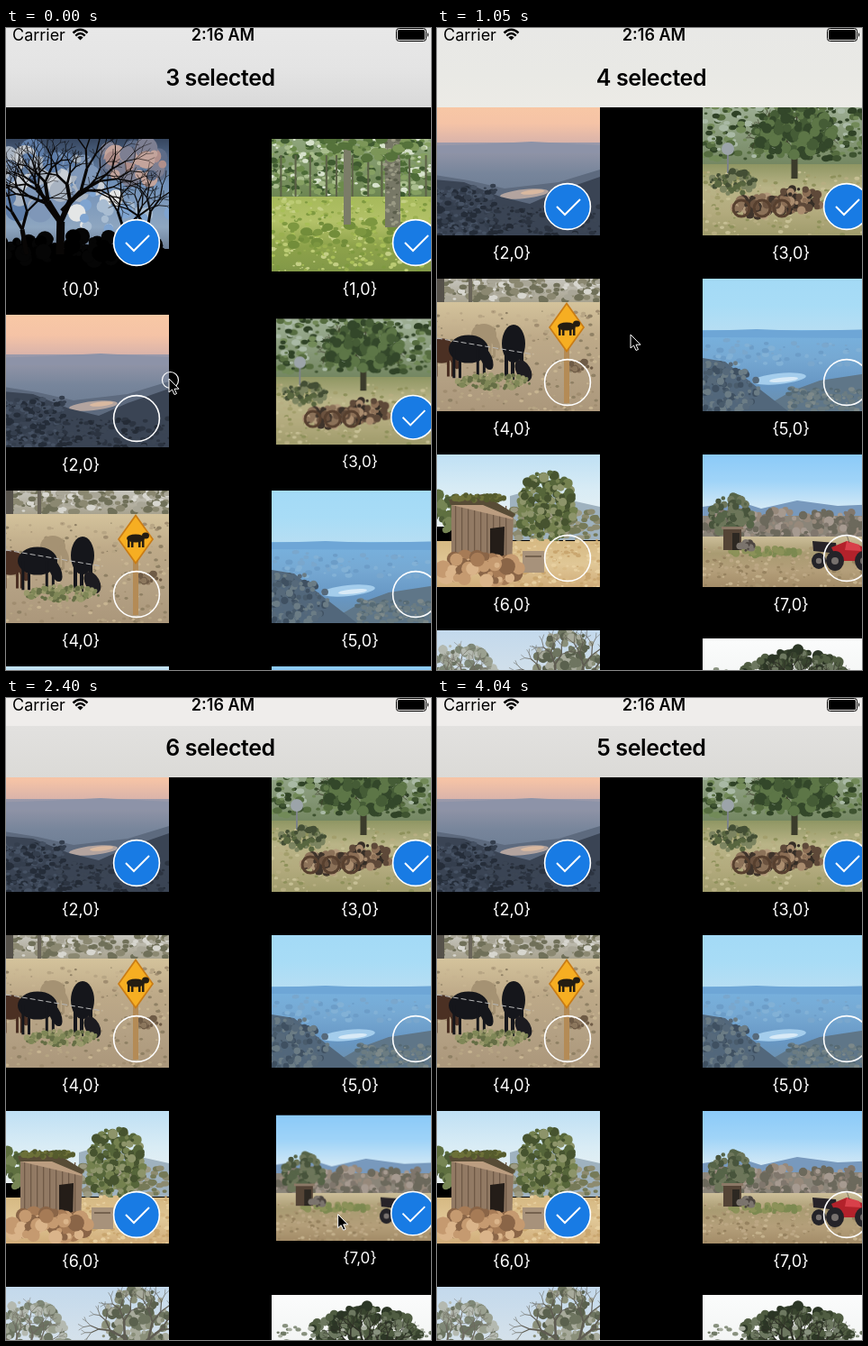
Recreate the animation shown at these times as an HTML page with a canvas. Size 472x712 px, loop 4140 ms.

```html
<!DOCTYPE html>
<html lang="en">
<head>
<meta charset="utf-8">
<title>Photo picker</title>
<style>
html, body { margin: 0; width: 100%; height: 100%; overflow: hidden; background: #000; }
#stage { position: relative; width: 472px; height: 712px; overflow: hidden; background: #000; font-family: Inter, Roboto, sans-serif; }
#list { position: absolute; left: 0; top: 0; }
.cell { position: absolute; width: 196px; height: 178px; }
.cell canvas, .cell svg { position: absolute; left: 0; top: 0; }
.label { position: absolute; left: 0; top: 155px; width: 100%; text-align: center; color: #fff; font-size: 18px; line-height: 23px; }
.badge circle { fill: none; stroke: #fff; stroke-width: 1.6; }
.badge path { fill: none; stroke: #fff; stroke-width: 2; visibility: hidden; }
.on circle { fill: #187be4; }
.on path { visibility: visible; }
#head { position: absolute; left: 0; top: 0; width: 472px; height: 88px; color: #000; }
#head div { position: absolute; white-space: nowrap; line-height: 22px; font-size: 18px; }
#head #title { left: 0; top: 39px; width: 476px; text-align: center; font-size: 25px; line-height: 32px; font-weight: 600; letter-spacing: -.4px; }
#head svg { position: absolute; left: 0; top: 0; }
#cursor { position: absolute; left: 0; top: 0; overflow: visible; }
</style>
</head>
<body>
<div id="stage">
  <div id="list"></div>
  <div id="head">
    <div style="left:7px;top:-3px">Carrier</div>
    <div style="left:5px;top:-3px;width:472px;text-align:center;font-weight:600">2:16 AM</div>
    <div id="title"></div>
    <svg width="472" height="24">
      <g fill="none" stroke="#000" stroke-width="2.4">
        <path d="M74.5 5.5Q82.5-2 90.5 5.5M77.3 8.6Q82.5 3.6 87.7 8.6"/>
      </g>
      <path d="M79.4 10.4Q82.5 7.6 85.6 10.4L82.5 13.6Z"/>
      <rect x="433.5" y=".5" width="33" height="14" rx="3" fill="none" stroke="#000"/>
      <rect x="435" y="2" width="30" height="11" rx="1.5"/>
      <path d="M468 5q2.5 2.5 0 5z"/>
    </svg>
  </div>
  <svg id="cursor" width="20" height="24">
    <circle id="ring" cx="1.5" cy="1.5" r="9" fill="none" stroke="#fff" stroke-width="1.2"/>
    <path d="M0 0V15L3.5 12 6 17.5 8.5 16.5 6 11.2H11Z" fill="#000" stroke="#fff"/>
  </svg>
</div>
<script>
const $ = id => document.getElementById(id);
const W = 196, H = 147;
let g, seed;

// ---- drawing helpers ----
const rnd = () => (seed = (seed * 16807) % 2147483647) / 2147483647;
const pick = list => list[Math.floor(rnd() * list.length)];
function rect(color, x, y, w, h) {
  g.fillStyle = color;
  g.fillRect(x, y, w, h);
}
function fade(y, h, ...colors) {
  const grad = g.createLinearGradient(0, y, 0, y + h);
  colors.forEach((c, i) => grad.addColorStop(i / (colors.length - 1), c));
  rect(grad, 0, y, W, h);
}
function poly(color, ...p) {
  g.fillStyle = color;
  g.beginPath();
  for (let i = 0; i < p.length; i += 2) g.lineTo(p[i], p[i + 1]);
  g.fill();
}
function oval(color, x, y, rx, ry = rx, turn = 0) {
  g.fillStyle = color;
  g.beginPath();
  g.ellipse(x, y, rx, ry, turn, 0, 7);
  g.fill();
}
// speckles inside a box
function fleck(n, x, y, w, h, r, colors) {
  const list = colors.split(' ');
  while (n--) {
    const s = r * (.4 + rnd());
    oval(pick(list), x + rnd() * w, y + rnd() * h, s, s * .7);
  }
}
// speckles inside an oval
function leaves(n, x, y, rx, ry, r, colors) {
  const list = colors.split(' ');
  while (n--) {
    const a = rnd() * 6.3, d = Math.sqrt(rnd());
    oval(pick(list), x + Math.cos(a) * d * rx, y + Math.sin(a) * d * ry, r * (.4 + rnd()));
  }
}
function limb(color, x, y, a, len, w) {
  const x2 = x + Math.cos(a) * len, y2 = y + Math.sin(a) * len;
  g.strokeStyle = color;
  g.lineWidth = w;
  g.beginPath();
  g.moveTo(x, y);
  g.lineTo(x2, y2);
  g.stroke();
  if (w < .6) return;
  for (const side of [-1, 1]) {
    limb(color, x2, y2, a + side * (.2 + rnd() * .5), len * (.68 + rnd() * .2), w * .66);
  }
}
function cow(color, x, y, w, h) {
  oval(color, x, y, w / 2, h * .3);
  for (const k of [-.4, -.25, .2, .36]) rect(color, x + k * w, y, 3, h * .62);
  oval(color, x + w * .45, y + h * .2, w * .14, h * .26, -.4);
}

// ---- the ten photos ----
const scenes = [
  () => { // bare trees at dusk
    fade(0, H, '#36465f', '#7090b8', '#8ea6c0', '#46536a');
    leaves(70, 50, 45, 65, 35, 10, '#c9cfd6 #7f97b8 #5f7ea9 #a9b4c2');
    leaves(40, 155, 28, 34, 22, 9, '#c3a49c #b08f8b #7d7f92 #5d6c88');
    leaves(30, 140, 80, 60, 22, 7, '#e4e6e6 #7fa4d0 #a9bdd2');
    rect('#000', 0, 122, W, 25);
    leaves(90, 95, 122, 105, 14, 7, '#000 #050505');
    limb('#080605', 75, 128, -1.55, 36, 9);
    limb('#080605', 76, 94, -2.2, 28, 5);
    limb('#080605', 77, 80, -.8, 30, 5);
    limb('#080605', 38, 128, -1.75, 28, 5);
    limb('#080605', 142, 128, -1.4, 26, 4.5);
    limb('#080605', 178, 128, -1.8, 27, 4.5);
  },
  () => { // meadow
    fade(0, 66, '#8fa57c', '#6c8550');
    fleck(420, 0, 0, W, 62, 3.6, '#4d6b37 #6d8b4c #a9bd8d #d7e2cc #3f5a30 #86a062');
    for (let i = 0; i < 12; i++) rect('#5d6248', 6 + i * 16 + rnd() * 6, 18, 2, 48);
    fade(64, 83, '#a6b95b', '#b3c168', '#8da24a', '#829848');
    fleck(420, 0, 66, W, 81, 2.4, '#a9bf58 #bccb74 #7f9a40 #9bb050 #c4cf85');
    fleck(50, 20, 92, 150, 26, 5, '#7d9740 #728d3a');
    rect('#7b7c68', 80, 0, 8, 95);
    rect('#777866', 126, 0, 17, 98);
    fleck(60, 126, 0, 15, 98, 2, '#5b5e4c #9a9a84');
    fleck(50, 60, 0, 100, 22, 5, '#55723b #7c9658');
  },
  () => { // dusk valley
    fade(0, 46, '#f8c8a5', '#f5c3a6', '#d7b2aa');
    fade(44, 103, '#9b9aab', '#77859b', '#697a90', '#4f5d71');
    poly('#8d93a8', 0, 48, 60, 46, 120, 43, W, 47, W, 56, 0, 56);
    poly('#5d6a7e', 0, 78, 50, 86, 90, 95, 150, 88, W, 74, W, H, 0, H);
    oval('#b3a49f', 112, 101, 27, 5, -.1);
    oval('#d9b9a0', 121, 99, 13, 2.5, -.1);
    poly('#3a4454', 0, 84, 45, 88, 85, 104, 118, 112, 150, 98, W, 82, W, H, 0, H);
    fleck(240, 0, 90, 80, 57, 3, '#252d39 #343e4d #465264');
    fleck(150, 70, 114, 126, 33, 3, '#2c3441 #3b4554 #242b36');
  },
  () => { // old farm tools
    fade(0, 80, '#9fb096', '#6d8059');
    fleck(330, 0, 0, W, 62, 4, '#3e5330 #566d40 #728a58 #2f4226 #a9b9a5');
    fade(68, 79, '#8f9663', '#b9b487', '#b3ab7e', '#a09c6c');
    fleck(260, 0, 76, W, 71, 2.2, '#c6bf94 #a39f6c #8e915b #b7ae82');
    limb('#3b3b2b', 102, 84, -1.57, 24, 7);
    leaves(170, 102, 32, 44, 28, 5, '#33472a #455c36 #5d7647');
    rect('#7c8287', 27, 50, 2, 28);
    oval('#9ca4a9', 28, 51, 7);
    leaves(80, 34, 88, 26, 13, 3, '#58663f #7c8460 #444f35');
    leaves(90, 62, 115, 28, 11, 4, '#6b523f #8c7259 #3f342b #b49b7c');
    leaves(80, 106, 109, 27, 14, 4, '#5e4939 #8b6e55 #352d26 #a98c6e');
    for (const x of [43, 66, 88]) {
      g.strokeStyle = '#57402f';
      g.lineWidth = 3;
      g.beginPath();
      g.arc(x, 117, 9, 0, 7);
      g.stroke();
    }
  },
  () => { // cattle
    fade(0, 30, '#c6c5bd', '#a39d88');
    fleck(190, 0, 0, W, 24, 4, '#707059 #8b8871 #a9a697 #d7d6cf');
    rect('#55514a', 15, 0, 8, 48);
    rect('#6a6559', 50, 0, 4, 30);
    fade(26, 121, '#d4c39c', '#bda988', '#b4a184', '#ab977b');
    fleck(300, 0, 36, W, 111, 2, '#c7b491 #a08d70 #b7a584 #8f8064');
    cow('#4b3023', 20, 80, 30, 46);
    cow('#a59273', 67, 62, 28, 40);
    cow('#15161b', 50, 78, 44, 52);
    oval('#15161b', 100, 72, 13, 21);
    for (const x of [90, 97, 107]) rect('#15161b', x, 80, 4, 32);
    oval('#1c1b20', 111, 102, 8, 13, -.5);
    leaves(130, 78, 114, 42, 8, 2.4, '#7f8757 #656e45 #9a9a6c');
    g.strokeStyle = '#b9b9b9';
    g.lineWidth = 1;
    g.setLineDash([6, 3]);
    g.beginPath();
    g.moveTo(15, 66);
    g.lineTo(122, 84);
    g.stroke();
    g.setLineDash([]);
    leaves(22, 174, 97, 14, 6, 3, '#6e5b46 #8c775d');
    rect('#b48b56', 156, 76, 6, 62);
    poly('#c97c15', 159, 26, 179, 54, 159, 82, 139, 54);
    poly('#f6ae22', 159, 29, 177, 54, 159, 79, 141, 54);
    oval('#241d12', 159, 53, 10, 4.5);
    for (const x of [150, 154, 162, 166]) rect('#241d12', x, 54, 2.5, 9);
    oval('#241d12', 170, 50, 4, 3.5);
  },
  () => { // blue valley
    fade(0, 58, '#a3daf6', '#a8dcf6', '#b6def3');
    fade(57, 90, '#78b2df', '#76a9d3', '#6797c4', '#6d8ea8');
    poly('#6ea6d6', 0, 58, 60, 56, 110, 58, W, 56, W, 66, 0, 65);
    fleck(80, 0, 66, W, 30, 3, '#82b1d6 #6c9dc8 #7aa7cd');
    oval('#a4cdec', 85, 111, 30, 6, -.1);
    oval('#d8eaf7', 90, 112, 16, 2.6, -.1);
    poly('#5f7688', 60, H, 100, 124, 130, 113, W, 103, W, H);
    fleck(150, 95, 122, 101, 25, 3, '#6b7c82 #566a75 #7d898a');
    poly('#52677b', 0, 88, 25, 92, 55, 116, 95, H, 0, H);
    leaves(180, 18, 122, 44, 32, 3, '#3f5061 #56697a #6b7c85 #495b6b');
  },
  () => { // timber shed
    fade(0, 80, '#bfe0f4', '#d9ecf5', '#eaf1f2');
    poly('#9fb2bf', 96, 46, 125, 38, 160, 50, W, 58, W, 95, 96, 95);
    fleck(120, 90, 60, 106, 34, 4, '#8d8b70 #767a58 #9c9a82');
    leaves(60, 22, 64, 22, 20, 5, '#5f7040 #768554 #4d5c36');
    leaves(230, 137, 59, 32, 40, 4, '#56663a #74814f #46532f #8d946a');
    fade(96, 51, '#d6b983', '#e0c796', '#d0ac79');
    fleck(200, 90, 94, 106, 53, 2.2, '#e7cf9f #c9a66f #d9bb86');
    poly('#927a64', 31, 56, 100, 66, 98, 128, 31, 112);
    for (let x = 35; x < 98; x += 7) rect('#6f5947', x, 57, 1.3, 58);
    poly('#bb9d80', 31, 56, 71, 52, 100, 66, 99, 72);
    poly('#584c36', 28, 50, 66, 44, 102, 66, 99, 70, 66, 56, 30, 56);
    leaves(50, 60, 48, 30, 4, 2.5, '#6c7038 #555b2d');
    poly('#241d18', 74, 82, 90, 80, 89, 124, 74, 122);
    rect('#a7927b', 110, 107, 24, 24);
    rect('#75624f', 113, 112, 18, 2);
    leaves(85, 62, 127, 50, 14, 7, '#c59a70 #dab48a #a67b56 #8a6547');
  },
  () => { // field with quad bike
    fade(0, 60, '#8bcaf8', '#a0d4f8', '#d3e9f6');
    poly('#7899bd', 0, 58, 40, 52, 65, 60, 105, 51, 150, 57, W, 55, W, 75, 0, 75);
    rect('#8b8579', 0, 68, W, 28);
    leaves(220, 100, 78, 112, 17, 4, '#80776d #6c695c #97897b #a69a90');
    leaves(90, 32, 68, 24, 22, 4, '#566448 #6d765a #48543c');
    fade(91, 56, '#cdbf9a', '#a99b72', '#b49f7a', '#a38c68');
    fleck(260, 0, 103, W, 44, 2, '#bca784 #96825f #aa9671 #c5b28d');
    leaves(60, 72, 108, 42, 4, 3, '#7c8950 #8c9259');
    rect('#544436', 23, 82, 20, 24);
    rect('#2d2822', 33, 87, 8, 19);
    rect('#8b7866', 21, 80, 24, 3);
    leaves(26, 48, 102, 8, 5, 3, '#4c4540 #7b746d');
    poly('#272328', 122, 96, 148, 98, 150, 110, 123, 107);
    poly('#b3222b', 143, 103, 160, 96, 180, 103, 188, 118, 150, 118);
    poly('#d8404a', 160, 96, 174, 100, 176, 107, 158, 106);
    for (const [x, r] of [[129, 8], [147, 10], [179, 10]]) {
      oval('#242328', x, 118, r, r + 1);
      oval('#77716e', x, 118, r * .4);
    }
    limb('#2b282c', 163, 98, -1.9, 9, .5);
  },
  () => { // pale oaks
    fade(0, H, '#c3d9ec', '#d9e3ea', '#b5ad96');
    leaves(210, 38, 60, 46, 44, 4, '#7f8877 #9aa090 #6c7462 #b4b9b0');
    leaves(230, 160, 48, 38, 48, 4, '#6e7560 #8a8f79 #a7aa9b #5a614e');
    limb('#5f5c52', 158, 105, -1.57, 28, 6);
    limb('#6d6a60', 30, 110, -1.5, 26, 5);
  },
  () => { // lone oak, shorter picture
    g.translate(0, 9);
    fade(0, H - 18, '#fbfcfc', '#f1f3f2', '#a3a284');
    leaves(300, 104, 46, 62, 34, 4.5, '#39452f #505d42 #2c3726 #6d7860');
    limb('#2e3026', 104, 110, -1.57, 24, 8);
    fleck(50, 0, 34, W, 22, 3, '#88917e #707a66 #a8ae9f');
  }
];

// ---- cells ----
const cells = scenes.map((scene, n) => {
  const el = document.createElement('div');
  el.className = 'cell';
  el.style.left = (n % 2 ? 295 : -15) + 'px';
  el.style.top = 123 + 195 * (n >> 1) + 'px';
  el.innerHTML = `<canvas width="${W}" height="${H}"></canvas>
    <svg class="badge" width="${W}" height="${H}"><g transform="translate(160 115)">
    <circle r="25.4"/><path d="M-12 0 -3 9 14-8"/></g></svg>
    <div class="label">{${n},0}</div>`;
  $('list').append(el);
  g = el.firstChild.getContext('2d');
  seed = 77 + n * 131;
  scene();
  return el;
});

// ---- motion: [step, value] pairs, each held until the next ----
const LOOP = 4140;
const scroll = [[0, 0], [6, 128], [7, 235], [8, 250]];
const count = [[0, 3], [2, 4], [11, 5], [16, 6], [22, 5]];
const press = [[0, 1], [2, 0], [6, 1], [7, 0], [10, 1], [11, 0], [15, 1], [16, 0], [22, 1], [23, 0]];
const scale = {
  2: [[0, 1], [1, .95], [4, .96], [5, .975], [6, 1]],
  3: [[0, .952], [1, .965], [2, .985], [3, 1]],
  6: [[0, 1], [10, .95], [12, .952], [13, .975], [14, 1]],
  7: [[0, 1], [15, .95], [18, .965], [19, .985], [20, 1], [22, .95], [24, .97], [25, 1]]
};
const picked = {
  0: [[0, 1]], 1: [[0, 1]], 3: [[0, 1]],
  2: [[0, 0], [2, 1]],
  6: [[0, 0], [11, 1]],
  7: [[0, 0], [16, 1], [22, 0]]
};
const glass = [
  [0, 'linear-gradient(#e8e8e8, #e4e4e4 50%, #d9d9d9)'],
  [6, 'linear-gradient(#e8e8e6, #e9e9e5 60%, #ecebe6)'],
  [8, 'linear-gradient(#e6e5e3, #e6e4e1 65%, #e8e3dc)'],
  [9, 'linear-gradient(#e6e6e5 31px, #dddddb 31px, #d7d7d5)'],
  [14, 'linear-gradient(#efedeb 31px, #e2e1df 31px, #dbdad7)']
];
const path = [
  [0, 181, 389], [2, 181, 391], [5, 231, 575], [6, 239, 407], [7, 215, 340], [8, 154, 422],
  [9, 150, 515], [11, 154, 525], [12, 316, 534], [15, 368, 572], [21, 372, 576], [23, 376, 582],
  [26, 465, 700], [27, 490, 740]
];

const at = (track, step) => track.reduce((v, [s, next]) => s <= step ? next : v, track[0][1]);
function along(step) {
  const i = Math.max(1, path.findIndex(p => p[0] >= step));
  const [s0, x0, y0] = path[i - 1], [s1, x1, y1] = path[i];
  const k = (step - s0) / (s1 - s0);
  return [x0 + (x1 - x0) * k, y0 + (y1 - y0) * k];
}

function draw(step) {
  $('list').style.transform = `translateY(${-at(scroll, step)}px)`;
  $('title').textContent = at(count, step) + ' selected';
  $('head').style.background = at(glass, step);
  cells.forEach((el, n) => {
    el.style.transform = scale[n] ? `scale(${at(scale[n], step)})` : '';
    el.classList.toggle('on', !!picked[n] && !!at(picked[n], step));
  });
  const [x, y] = along(step);
  $('cursor').style.transform = `translate(${x}px, ${y}px)`;
  $('ring').style.opacity = at(press, step);
}

const start = performance.now();
let shown = -1;
function tick() {
  const t = (performance.now() - start) % LOOP;
  const step = Math.floor((t < 2990 ? Math.min(t, 2989) : t + 10) / 150);
  if (step !== shown) draw(shown = step);
  requestAnimationFrame(tick);
}
tick();
</script>
</body>
</html>
```
